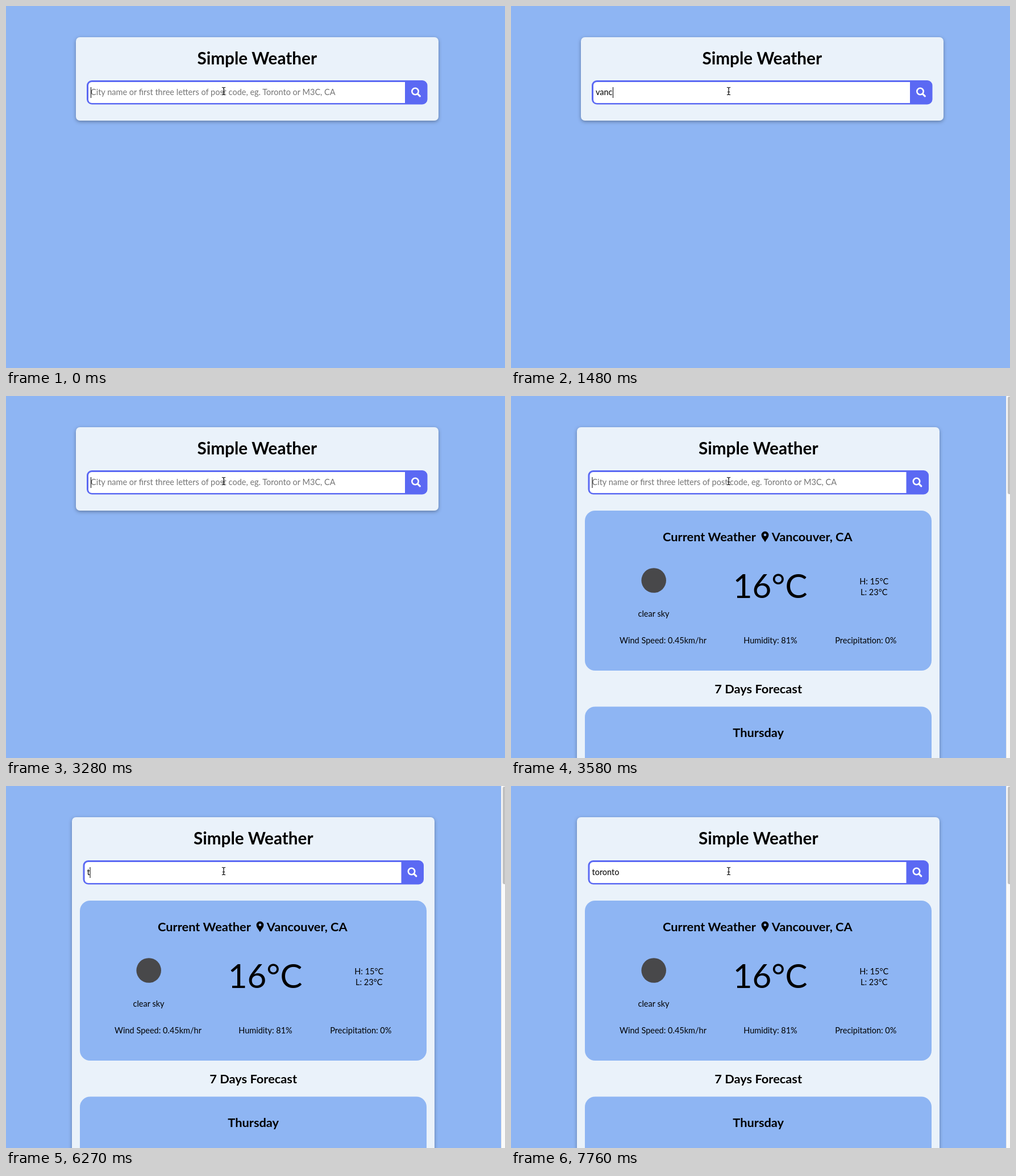
An HTML page for the animation above (8000 ms loop, 878x638 px).

```html
<!DOCTYPE html>
<html lang="en">
<head>
<meta charset="utf-8">
<title>Simple Weather</title>
<style>
  html, body { margin: 0; width: 100%; height: 100%; overflow: hidden; background: #8eb5f3; }
  svg { display: block; width: 878px; height: 638px; font: 14.5px Lato, "Open Sans", sans-serif; }
  .card { fill: #eaf2fa; filter: drop-shadow(0 2px 3px rgba(0, 0, 0, .32)); }
  .panel { fill: #8eb5f3; }
  .accent { fill: #5b69f3; }
  .mid { text-anchor: middle; }
  .title { font-size: 29.7px; font-weight: 700; }
  .head { font-size: 21.8px; font-weight: 700; }
  .temp { font-size: 58.3px; }
  .hint { fill: #757575; }
  .results { display: none; }
  .found .results { display: inline; }
  .found .form { transform: translateX(-6.5px); }
  .found .card { transform: translateX(-7px); height: 640px; }
</style>
</head>
<body>
<svg id="page" viewBox="0 0 878 638">
  <rect class="card" x="123" y="55" width="638" height="147" rx="7"/>

  <g class="form">
    <text class="title mid" x="441.7" y="102.5">Simple Weather</text>
    <rect class="accent" x="142" y="131" width="599.5" height="42.5" rx="9"/>
    <path fill="#fff" d="M702 134H151a6 6 0 0 0-6 6v25a6 6 0 0 0 6 6h551z"/>
    <g fill="none" stroke="#fff">
      <circle cx="720" cy="150.5" r="5.7" stroke-width="2.6"/>
      <path d="M724.3 154.8l4 4" stroke-width="3.2" stroke-linecap="round"/>
    </g>
    <text class="hint" id="hint" x="149" y="157">City name or first three letters of post code, eg. Toronto or M3C, CA</text>
    <text id="typed" x="149" y="157"></text>
    <rect id="caret" x="149" y="143" width="1" height="19"/>
  </g>

  <g class="results">
    <rect class="panel" x="130" y="202" width="610" height="282" rx="18"/>
    <text class="head" x="267" y="255.5">Current Weather</text>
    <path fill-rule="evenodd" d="M447 257.5C445 253.5 440.6 249.5 440.6 245a6.4 6.4 0 0 1 12.8 0C453.4 249.5 449 253.5 447 257.5zM447 242.6a2.3 2.3 0 1 0 .01 0z"/>
    <text class="head" x="458.7" y="255.5">Vancouver, CA</text>

    <circle cx="251.2" cy="325" r="21.8" fill="#48484a"/>
    <text class="mid" x="251" y="388.5">clear sky</text>
    <text class="temp mid" x="456" y="356">16°C</text>
    <g class="mid">
      <text x="638.7" y="332">H: 15°C</text>
      <text x="638.7" y="351.3">L: 23°C</text>
      <text x="267.5" y="436.3">Wind Speed: 0.45km/hr</text>
      <text x="456.5" y="436.3">Humidity: 81%</text>
      <text x="624.3" y="436.3">Precipitation: 0%</text>
    </g>

    <text class="head mid" x="435.2" y="523.5">7 Days Forecast</text>
    <rect class="panel" x="130" y="547.5" width="610" height="140" rx="18"/>
    <text class="head mid" x="435.2" y="600.5">Thursday</text>

    <rect x="871" width="7" height="638" fill="#fafafa"/>
    <path d="M871.5 0V638" stroke="#e6e6e6"/>
    <rect x="874" y="1" width="8" height="172" rx="3" fill="#c1c1c1"/>
  </g>

  <g fill="none" stroke-linecap="square">
    <path id="beam" d="M380.5 143.5q2.5 0 2.5 1.5 0-1.5 2.5-1.5M383 145v10M380.5 156.5q2.5 0 2.5-1.5 0 1.5 2.5 1.5M381.5 151.5h3" stroke="#fff" stroke-opacity=".8" stroke-width="2.6"/>
    <use href="#beam" style="display:none"/>
    <path d="M380.5 143.5q2.5 0 2.5 1.5 0-1.5 2.5-1.5M383 145v10M380.5 156.5q2.5 0 2.5-1.5 0 1.5 2.5 1.5M381.5 151.5h3" stroke="#000" stroke-width="1.2"/>
  </g>
</svg>
<script>
  const LOOP = 8000, FOUND_AT = 3580, FIELD_X = 149;

  // [start ms, field text, caret shown]
  const steps = [
    [0, "", 1], [300, "", 0], [900, "", 1],
    [1050, "v", 1], [1200, "va", 1], [1330, "van", 1], [1480, "vanc", 1],
    [1630, "vancou", 1], [1780, "vancouv", 1], [2080, "vancouve", 1],
    [2230, "vancouver", 1], [2830, "vancouver", 0],
    [3280, "", 1], [3730, "", 0], [4330, "", 1], [4780, "", 0], [5220, "", 1], [5820, "", 0],
    [6270, "t", 1], [6420, "to", 1], [6570, "tor", 1], [6720, "toro", 1],
    [6870, "toron", 1], [7020, "toront", 1], [7160, "toronto", 1], [7760, "toronto", 0]
  ];

  const get = id => document.getElementById(id);
  const page = get("page"), hint = get("hint"), typed = get("typed"), caret = get("caret");
  const show = (el, on) => { el.style.visibility = on ? "visible" : "hidden"; };

  function draw() {
    const t = performance.now() % LOOP;
    const [, text, caretOn] = steps.findLast(([start]) => start <= t);
    page.classList.toggle("found", t >= FOUND_AT);
    if (typed.textContent !== text) typed.textContent = text;
    show(hint, !text);
    show(caret, caretOn);
    caret.setAttribute("x", FIELD_X + (text ? Math.round(typed.getComputedTextLength()) : 0));
    requestAnimationFrame(draw);
  }
  draw();
</script>
</body>
</html>
```
